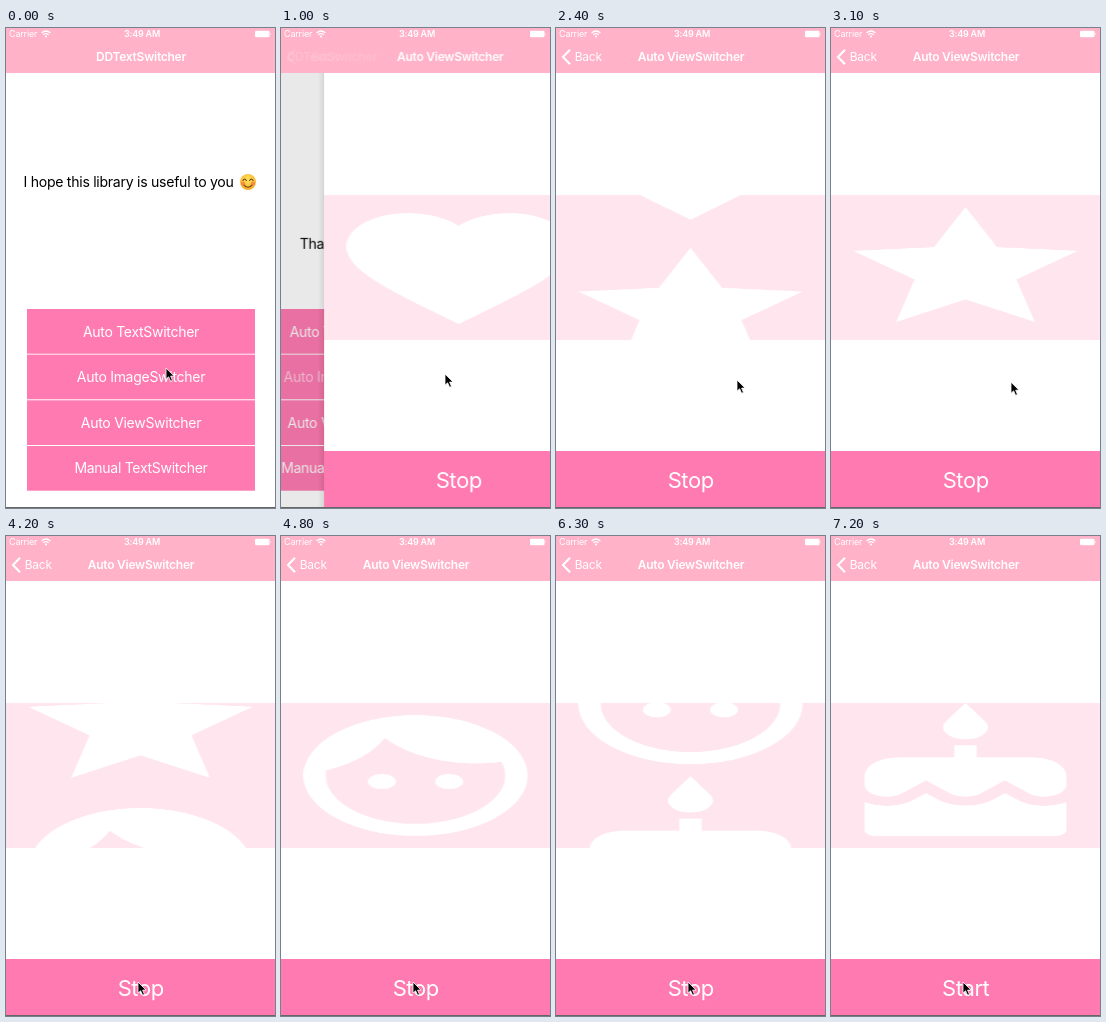
Recreate the animation shown at these times as an HTML page. Size 269 by 480 pixels, loop 8 s.

```html
<!DOCTYPE html>
<html lang="en">
<head>
<meta charset="utf-8">
<title>Switcher demo</title>
<style>
  html, body { margin: 0; width: 100%; height: 100%; overflow: hidden; background: #fff; }
  svg { display: block; width: 100%; height: 100%; }
  text { font-family: Inter, "Open Sans", sans-serif; letter-spacing: -.02em; fill: #fff; }
  .mid { text-anchor: middle; }
  .message { font-size: 14.1px; fill: #000; }
  .option { font-size: 14px; }
  .action { font-size: 22px; }
  .bar { font-size: 12px; }
  .heading { font-weight: 600; }
  .status { font-size: 9px; }
  .pink { fill: #ff7ab1; }
  .soft { filter: blur(.7px); }

  .anim { animation: 8s linear infinite; }
  .messages { animation-name: messages; animation-timing-function: ease-in-out; }
  .strip { animation-name: strip; animation-timing-function: ease-in-out; }
  .menu, .dim, .page, .new-title, .back-slide, .old-title {
    animation-timing-function: cubic-bezier(.05, .88, .25, 1);
  }
  .menu { animation-name: menu; }
  .dim { animation-name: dim; }
  .page { animation-name: page; }
  .new-title { animation-name: new-title; }
  .old-title { animation-name: old-title; }
  .back-slide { animation-name: back-slide; }
  .back-fade { animation-name: back-fade; }
  .tapped { animation-name: tapped; }
  .stop { animation-name: stop; }
  .start { animation-name: start; }
  .cursor { animation-name: cursor; }

  @keyframes messages {
    0%, 4.625% { transform: translateY(0); }
    17.125%, 100% { transform: translateY(-218px); }
  }
  @keyframes strip {
    0%, 22.1% { transform: translateY(0); }
    34.6%, 47.3% { transform: translateY(-145px); }
    59.8%, 72.55% { transform: translateY(-290px); }
    85.05%, 100% { transform: translateY(-435px); }
  }
  @keyframes menu {
    0%, 11.25% { transform: translateX(0); }
    16.25%, 100% { transform: translateX(-81px); }
  }
  @keyframes dim {
    0%, 11.25% { opacity: 0; }
    16.25%, 100% { opacity: .1; }
  }
  @keyframes page {
    0%, 11.25% { transform: translateX(275px); }
    16.25%, 100% { transform: translateX(0); }
  }
  @keyframes new-title {
    0%, 11.25% { transform: translateX(219px); }
    16.25%, 100% { transform: translateX(0); }
  }
  @keyframes old-title {
    0%, 11.25% { transform: translateX(0); opacity: 1; }
    16.25%, 100% { transform: translateX(-100px); opacity: 0; }
  }
  @keyframes back-slide {
    0%, 11.25% { transform: translateX(75px); }
    16.25%, 100% { transform: translateX(0); }
  }
  @keyframes back-fade {
    0%, 11.75% { opacity: 0; }
    12.5% { opacity: .14; }
    17.5%, 100% { opacity: 1; }
  }
  @keyframes tapped {
    0%, 8.75% { opacity: 1; }
    10%, 11.25% { opacity: .3; }
    12.5% { opacity: .6; }
    14%, 100% { opacity: 1; }
  }
  @keyframes stop {
    0%, 81.9% { opacity: 1; }
    82.6%, 86.2% { opacity: .25; }
    86.21%, 100% { opacity: 0; }
  }
  @keyframes start {
    0%, 86.2% { opacity: 0; }
    86.21% { opacity: .25; }
    87.5%, 100% { opacity: 1; }
  }
  @keyframes cursor {
    0% { transform: translate(160px, 340px); }
    5% { transform: translate(163px, 358px); }
    11.25%, 19.9% { transform: translate(164px, 346px); }
    20%, 38.6% { transform: translate(181px, 352px); }
    38.75% { transform: translate(180px, 354px); }
    40% { transform: translate(176px, 366px); }
    43% { transform: translate(136px, 463px); }
    45%, 100% { transform: translate(132px, 446px); }
  }
</style>
</head>
<body>
<svg viewBox="0 0 269 480" preserveAspectRatio="none">
  <defs>
    <clipPath id="messageArea"><rect y="45" width="269" height="236"/></clipPath>
    <clipPath id="imageArea"><rect y="167" width="269" height="145"/></clipPath>
    <linearGradient id="edge">
      <stop offset="0" stop-opacity="0"/>
      <stop offset="1" stop-opacity=".09"/>
    </linearGradient>
    <radialGradient id="gold" cy=".35" r=".7">
      <stop offset="0" stop-color="#ffe45c"/>
      <stop offset="1" stop-color="#f5a623"/>
    </radialGradient>
    <g id="smiley">
      <circle r="8" fill="url(#gold)"/>
      <g fill="#f2704e" opacity=".65"><circle cx="-5" cy="1.6" r="2"/><circle cx="5" cy="1.6" r="2"/></g>
      <path d="M-5-1.5q1.7-3 3.4 0M1.6-1.5q1.7-3 3.4 0M-4 3.2q4 4.2 8 0" fill="none" stroke="#6b3d12" stroke-width="1.1" stroke-linecap="round"/>
    </g>
  </defs>

  <rect width="269" height="480" fill="#fff"/>

  <g class="anim menu">
    <g clip-path="url(#messageArea)">
      <g class="anim messages">
        <text class="message" x="17.5" y="159">I hope this library is useful to you</text>
        <use href="#smiley" x="242" y="154"/>
        <text class="message" x="87" y="377">Thank you!</text>
        <use href="#smiley" x="172" y="372"/>
      </g>
    </g>
    <g class="pink">
      <rect x="21" y="281" width="228" height="44.7"/>
      <rect x="21" y="326.6" width="228" height="44.7"/>
      <rect x="21" y="372.3" width="228" height="44.7"/>
      <rect x="21" y="418" width="228" height="44.7"/>
    </g>
    <g class="option mid">
      <text x="135" y="308.5">Auto TextSwitcher</text>
      <text x="135" y="354.2" class="anim tapped">Auto ImageSwitcher</text>
      <text x="135" y="399.8">Auto ViewSwitcher</text>
      <text x="135" y="445.4">Manual TextSwitcher</text>
    </g>
  </g>
  <rect class="anim dim" width="269" height="480"/>

  <g class="anim page">
    <rect x="-6" y="45" width="6" height="435" fill="url(#edge)"/>
    <rect y="45" width="269" height="435" fill="#fff"/>
    <rect y="167" width="269" height="145" fill="#ffe6ee"/>
    <g clip-path="url(#imageArea)">
      <g class="anim strip">
        <g transform="translate(0 167) scale(11.208 6.042)" fill="#fff">
          <g class="soft-icons">
            <path d="M12 21.35l-1.45-1.32C5.4 15.36 2 12.28 2 8.5 2 5.42 4.42 3 7.5 3c1.74 0 3.41.81 4.5 2.09C13.09 3.81 14.76 3 16.5 3 19.58 3 22 5.42 22 8.5c0 3.78-3.4 6.86-8.55 11.54z"/>
            <path transform="translate(0 24)" d="M12 17.27L18.18 21l-1.64-7.03L22 9.24l-7.19-.61L12 2 9.19 8.63 2 9.24l5.46 4.73L5.82 21z"/>
            <g transform="translate(0 48)">
              <circle cx="12" cy="12" r="10"/>
              <path fill="#ffe6ee" d="M12 20c-4.41 0-8-3.59-8-8 0-.29.02-.58.05-.86 2.36-1.05 4.23-2.98 5.21-5.37C11.07 8.33 14.05 10 17.42 10c.78 0 1.53-.09 2.25-.26.21.71.33 1.47.33 2.26 0 4.41-3.59 8-8 8z"/>
              <circle cx="9" cy="13" r="1.25"/>
              <circle cx="15" cy="13" r="1.25"/>
            </g>
            <g transform="translate(0 72)">
              <path d="M12 6a2 2 0 0 0 1.71-3.03L12 0l-1.71 2.97A2 2 0 0 0 12 6z"/>
              <path d="M18 9h-5V7h-2v2H6a3 3 0 0 0-3 3v1.54c0 1.08.88 1.96 1.96 1.96.52 0 1.02-.2 1.38-.57l2.14-2.13 2.13 2.13c.74.74 2.03.74 2.77 0l2.14-2.13 2.13 2.13c.37.37.86.57 1.38.57 1.08 0 1.96-.88 1.96-1.96V12a3 3 0 0 0-3-3z"/>
              <path d="M16.6 15.99l-1.07-1.08-1.08 1.07c-1.3 1.3-3.58 1.31-4.89 0l-1.07-1.07-1.09 1.07C6.75 16.64 5.88 17 4.96 17c-.73 0-1.4-.23-1.96-.61V21a1 1 0 0 0 1 1h16a1 1 0 0 0 1-1v-4.61c-.56.38-1.23.61-1.96.61-.92 0-1.79-.36-2.44-1.01z"/>
            </g>
          </g>
        </g>
      </g>
    </g>
    <rect class="pink" y="423" width="269" height="57"/>
    <g class="action mid">
      <text class="anim stop" x="134.7" y="460">Stop</text>
      <text class="anim start" x="134.7" y="460">Start</text>
    </g>
  </g>

  <rect width="269" height="45" fill="#ffb2c8"/>
  <text class="status" x="3" y="9">Carrier</text>
  <g fill="none" stroke="#fff" stroke-width="1.2">
    <path d="M35.6 5q4.4-4 8.8 0M37.3 6.9q2.7-2.4 5.4 0"/>
    <circle cx="40" cy="8.5" r=".5"/>
  </g>
  <text class="status heading mid" x="136" y="9">3:49 AM</text>
  <rect x="249" y="2.8" width="14.5" height="6.4" rx="1.2" fill="#fff"/>
  <path d="M264.4 4.8q1.4 1.2 0 2.4z" fill="#fff"/>
  <g class="bar">
    <text class="heading mid anim old-title" x="135" y="33.4">DDTextSwitcher</text>
    <g class="anim new-title"><text class="heading mid" x="135" y="33.4">Auto ViewSwitcher</text></g>
    <g class="anim back-fade">
      <path d="M14 21.8L7 29l7 7.2" fill="none" stroke="#fff" stroke-width="2.1"/>
      <text class="anim back-slide" x="18.7" y="33.4">Back</text>
    </g>
  </g>

  <rect y="479" width="269" height="1" fill="#666"/>
  <path class="anim cursor" d="M0 0v11.2l2.6-2.4 2 4.4 1.9-.8-1.9-4.3h3.5z" stroke="#fff" stroke-width=".8"/>
</svg>
</body>
</html>
```
